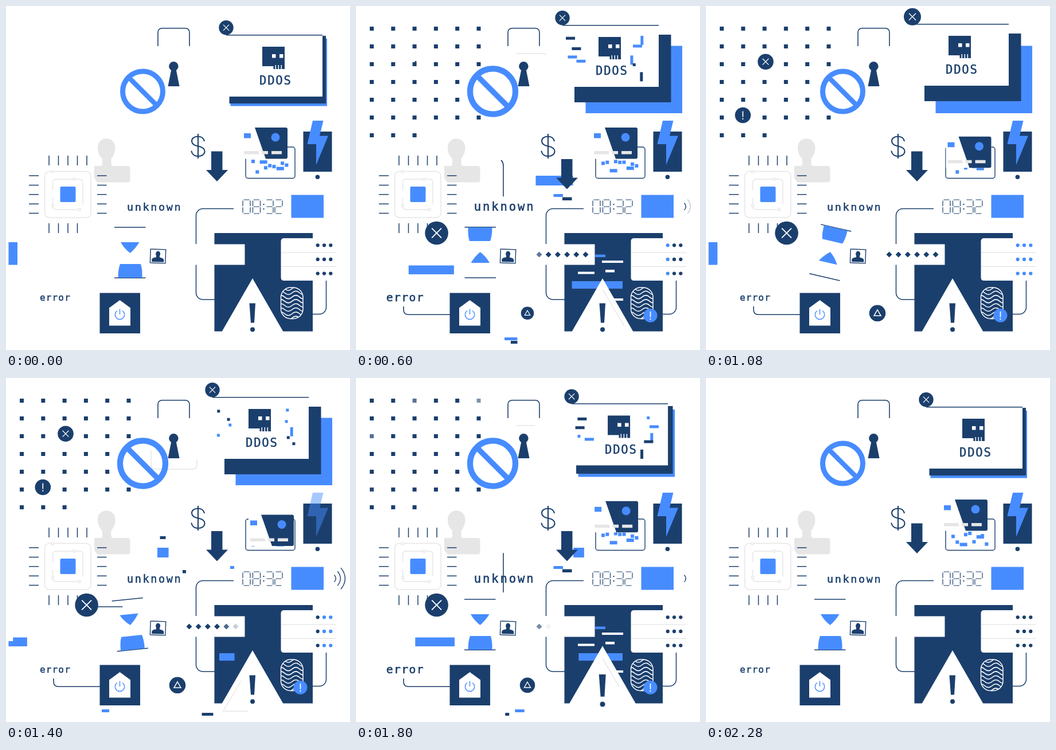
Animation, 600 px wide and 600 px high, one loop 2320 ms. Source, as an HTML page:

```html
<!DOCTYPE html>
<html lang="en">
<head>
<meta charset="utf-8">
<title>Cyber threats</title>
<style>
html, body { margin: 0; width: 100%; height: 100%; overflow: hidden; background: #fff; }
svg { display: block; width: 100%; height: 100%; }
text { font-family: "DejaVu Sans Mono", "Noto Sans Mono", monospace; fill: #1b3f6d; stroke: #1b3f6d; stroke-width: .5; }
</style>
</head>
<body>
<svg id="stage" viewBox="0 0 600 600"></svg>
<script>
const NAVY = '#1b3f6d', BLUE = '#478cff', GREY = '#e6e6e6', WHITE = '#fff';
const LOOP = 2320, STEP = 40, CYCLE = 1080;
const stage = document.getElementById('stage');

const clamp = v => Math.max(0, Math.min(1, v));
const smooth = p => p * p * (3 - 2 * p);
const cubic = p => p < .5 ? 4 * p ** 3 : 1 - 4 * (1 - p) ** 3;
const ramp = (t, a, b, ease = smooth) => ease(clamp((t - a) / (b - a)));
// 0 to 1 between a and b, back to 0 between c and d
const hold = (t, a, b, c, d) => ramp(t, a, b) - ramp(t, c, d);
// Tail and head of a moving stretch; the head runs a to b, the tail c to d
const sweep = (t, a, b, c, d) => [ramp(t, c, d), ramp(t, a, b)];
const within = (t, a, b) => t >= a && t < b;

// Most parts play twice; the second pass slows down after its start
const pass = t => t < CYCLE ? t : t - CYCLE;
function beat(t) {
  const u = pass(t);
  return t < CYCLE || u < 320 ? u : 320 + (u - 320) * .8;
}

function noise(seed) {
  const v = Math.sin(seed * 12.9898) * 43758.5453;
  return v - Math.floor(v);
}

const rect = (x, y, w, h, fill, more = '') =>
  `<rect x="${x}" y="${y}" width="${w}" height="${h}" fill="${fill}" ${more}/>`;
const circle = (x, y, r, fill, more = '') => `<circle cx="${x}" cy="${y}" r="${r}" fill="${fill}" ${more}/>`;
const shape = (d, fill, more = '') => `<path d="${d}" fill="${fill}" ${more}/>`;
const line = (d, color = NAVY, w = 1.6, more = '') =>
  `<path d="${d}" fill="none" stroke="${color}" stroke-width="${w}" ${more}/>`;
const group = (transform, body) => `<g transform="${transform}">${body}</g>`;
const scaleAt = (x, y, s, body) => group(`translate(${x} ${y}) scale(${s}) translate(${-x} ${-y})`, body);
const times = (n, draw) => Array.from({ length: n }, (_, i) => draw(i)).join('');

const trim = (d, [tail, head], color = NAVY, w = 1.6) => head - tail < .005 ? '' :
  line(d, color, w, `pathLength="1" stroke-dasharray="0 ${tail} ${head - tail} 9"`);

// Bar that travels from x0 to x1
function bar(x0, x1, [tail, head], y, h, fill) {
  if (head - tail < .005) return '';
  const a = x0 + (x1 - x0) * tail, b = x0 + (x1 - x0) * head;
  return rect(Math.min(a, b), y, Math.abs(b - a), h, fill);
}

const ICONS = {
  x: line('M-6 -6L6 6M6 -6L-6 6', WHITE, 1.4),
  bang: line('M0 -7V3M0 5V7.5', WHITE, 1.7),
  tri: line('M0 -6L6 4.5H-6Z', WHITE, 1.5)
};
const badge = (x, y, r, s, icon, fill = NAVY, size = 1) => s < .02 ? '' :
  group(`translate(${x} ${y}) scale(${s})`, circle(0, 0, r, fill) + group(`scale(${size})`, ICONS[icon]));

function dotGrid(t) {
  return times(39, i => {
    const x = 27.5 + i % 6 * 37.3, y = 39.5 + Math.floor(i / 6) * 31;
    if (Math.hypot(x - 238.5, y - 149) < 44) return '';
    const on = 60 + noise(i + 1) ** 2 * 290, off = 2000 - noise(i + 50) ** 2 * 400;
    const o = Math.min(clamp((t - on) / 200), clamp(1 - (t - off) / 240));
    return o ? rect(x - 3.5, y - 3.5, 7, 7, NAVY, `opacity="${o}"`) : '';
  });
}

function padlock(u) {
  const body = 'M261 83Q253 83 253 91V151Q253 159 261 159H325Q333 159 333 151V91Q333 83 325 83H279';
  return line('M265 70V46.7Q265 38.700 273 38.700H312Q320 38.700 320 46.700V70')
    + trim(body, sweep(u, 0, 560, 160, 770), GREY, 1.5)
    + circle(292.4, 105.3, 8.2, NAVY) + shape('M288.500 110H296.500L302.500 140H282.500Z', NAVY)
    + scaleAt(238.5, 149, 1 + .13 * hold(u, 40, 240, 640, 960),
      circle(238.5, 149, 35, 'none', `stroke="${BLUE}" stroke-width="9"`) + line('M214 124.500L263 173.500', BLUE, 8.5));
}

// Fragments left and right of the skull, reshuffled in short intervals
function fragments(u) {
  if (!within(u, 160, 760)) return '';
  const set = Math.floor(u / 160) * 40;
  return times(9, i => {
    const n = k => noise(set + i * 3 + k);
    const x = (i % 2 ? 390 : 502) + n(1) * 24;
    const long = n(2) > .45 ? 16 : 5, tall = i % 4 === 0 && long === 16;
    return rect(x, 68 + Math.floor(i / 2) * 14 + n(3) * 9, tall ? 5 : long, tall ? 16 : 5, i % 2 === (i > 4 ? 1 : 0) ? BLUE : NAVY);
  });
}

const skull = shape('M447 71H486V110H466.500V105H447Z', NAVY)
  + shape('M464 84h6.500v6.500h-6.500ZM477 84h6.500v6.500h-6.500Z', WHITE)
  + line('M470.300 103V111M475.300 103V111M480.300 103V111', WHITE, 1.5);

function attackWindow(t, u) {
  const open = hold(t, 40, 560, 1480, 2000), swing = open * (1 - open);
  const bump = hold(t, 920, 1080, 1080, 1240);
  const at = (x, y, bend, body) => group(`translate(${x * open - bend * swing} ${y * open - bend * swing * .9})`, body);
  const lift = body => group(`translate(0 ${-2 * bump})`, body);
  return at(9, 12.5, 31, rect(391.5, 57, 168.5, 117.5, BLUE))
    + lift(at(-8.5, -2, 12, rect(389.5, 52, 168.5, 118, NAVY))
      + at(-24, -17, 0, rect(384, 50.5, 168, 107.5, WHITE) + line('M384 50.700H552', NAVY, 1.5) + skull
        + '<text x="442" y="137.300" font-size="20.500" letter-spacing="1.800">DDOS</text>' + fragments(u)
        + badge(384, 37.8, 12.7, 1 + .18 * bump, 'x', NAVY, .85)));
}

const person = shape('M160 247C160 226 190.500 226 190.500 247C190.500 256 187 262 183.500 266V275Q183.500 279 188 279H212Q216.500 279 216.500 284V303Q216.500 307.500 212 307.500H159L154 300V279H164Q168 279 168 275V266C163 262 160 256 160 247Z', GREY);

const node = (x, y) => circle(x, y, 2.2, WHITE, `stroke="${GREY}" stroke-width="1.300"`);
const chip = rect(67.5, 288.5, 80.5, 80.5, WHITE, `rx="8" stroke="${GREY}" stroke-width="1.500"`)
  + times(5, i => {
    const x = 75 + i * 16.5, y = 296 + i * 16.4;
    return line(`M${x} 261V278M40 ${y}H57M159 ${y}H175.500` + (i < 4 ? `M${x} 379V396` : ''), NAVY, 1.5);
  })
  + line('M117 302H88Q81.500 302 81.500 308V322M81.500 346V334M121 302H128Q134 302 134 308V346M126 355H88Q81.500 355 81.500 350', GREY, 1.4)
  + node(81, 289) + node(119, 302) + node(81.5, 348) + node(128, 355)
  + rect(94.5, 315, 27, 27, BLUE, 'rx="2"');

function money(t, u) {
  const p = pass(t);
  return line('M346 236C345 231 341 227.500 335 227.500C328 227.500 324 231 324 235.500C324 240 327 243 335 244.500C343 246 346.500 249 346.500 253.500C346.500 258.500 342 262 335 262C328 262 324 258 323.500 252.500M335 223V266', NAVY, 2.1)
    + bar(264, 398, sweep(p, 190, 730, 460, 800), 296, 17, BLUE)
    + bar(264, 293, sweep(p, 240, 400, 280, 440), 276, 5, NAVY)
    + group(`translate(0 ${13.5 * hold(u, 40, 280, 760, 960)})`, shape('M358 253.500H377.500V286H387L368 306L349 286H358Z', NAVY))
    + (within(u, 280, 400) ? rect(391, 328, 7, 5, BLUE) : '')
    + (within(u, 480, 760) ? rect(344.5, 328, 16.5, 5, BLUE) + rect(360, 333.5, 16.5, 5.5, NAVY) : '');
}

function card(t, u) {
  const p = hold(t, 720, 1360, 1480, 1880), set = Math.floor(u / 220) * 30;
  return rect(418, 246, 86, 54.5, 'none', `rx="4" stroke="${NAVY}" stroke-width="1.400"`)
    + times(9, i => rect(428 + i * 7.3, 268 + noise(set + i) * 20, i % 4 === 2 ? 13 : 6, 6, BLUE))
    + group(`translate(${11 * p} ${26.5 * p})`, rect(412, 211, 79, 55.5, WHITE)
      + shape('M434 212H488Q491 212 491 215V263.500Q491 266.500 488 266.500H453Z', NAVY)
      + rect(415, 222, 12, 8.5, BLUE) + circle(470, 229, 7.5, BLUE)
      + shape('M415 253H440L442 258.500H415ZM445 253H457V258.500H447ZM463 253H481V258.500H463Z', GREY));
}

const phone = u => rect(518.5, 219, 50, 70, NAVY) + circle(543.4, 298.3, 3.8, NAVY)
  + shape('M535 200H553.500L547 226.500H562L541 277V241H525.500Z', BLUE, within(u, 280, 400) ? 'opacity=".480"' : '');

// Seven-segment digits, segments a to g
const SEGMENTS = { a: 'M1.5 0h10', b: 'M13 1.5v9.5', c: 'M13 13v9.5', d: 'M1.5 24h10', e: 'M0 13v9.5', f: 'M0 1.5v9.5', g: 'M1.5 12h10' };
const digit = (x, on) => group(`translate(${x} 338)`, line([...on].map(s => SEGMENTS[s]).join(''), NAVY, 1.2));
const clock = digit(413, 'abcdef') + digit(430.5, 'abcdefg') + digit(453, 'abcdg') + digit(469, 'abdeg')
  + rect(448.5, 345, 2, 2, NAVY) + rect(448.5, 353, 2, 2, NAVY);

const signal = u => rect(497.5, 329.5, 56.5, 40, BLUE) + times(3, i => {
  const h = 6.2 + i * 6.2, out = 660 - 150 * i;
  return line(`M${572.5 + i * 5.8} ${349.7 - h}q${5.5 + i * 4.6} ${h} 0 ${h * 2}`, NAVY, 1.4,
    `opacity="${hold(u, 120 + 50 * i, 220 + 50 * i, out, out + 140)}"`);
});

const fingerprint = '<clipPath id="pill"><rect x="479.500" y="491" width="38.500" height="54.500" rx="17"/></clipPath>'
  + line(Array.from({ length: 8 }, (_, i) => `M473 ${493 + i * 7.3}q6.500 -6 13 0t13 0t13 0t13 0`).join(''), WHITE, 1.5, 'clip-path="url(#pill)"')
  + rect(479.5, 491, 38.5, 54.5, 'none', 'rx="17" stroke="#fff" stroke-width="1.500"');

function warning(t, u) {
  const s = 1 + .14 * (hold(t, 120, 280, 400, 560) + hold(t, 1560, 1760, 1800, 1960));
  return scaleAt(430, 530, s, shape('M430 475L488.700 577H371.300Z', WHITE)
    + trim('M430 494L379 581H481Z', sweep(u, 40, 620, 180, 800), GREY, 1.3)
    + shape('M424.500 518.500H435L433 552.500H427Z', NAVY) + circle(430, 564.2, 4, NAVY));
}

const codeLines = shape('M429 444h37v4h-37ZM435 460h16v4.500h-16ZM387 463.500h29v4h-29ZM449 510h17v4h-17Z', WHITE)
  + rect(417, 433.5, 18, 4.5, BLUE);

function server(t, u) {
  const lights = times(9, i => {
    const col = i % 3, delay = 560 + col * 140;
    return circle(543.7 + col * 11.3, 417.3 + Math.floor(i / 3) * 24.6, 3.1, within(t, delay, delay + 760) ? BLUE : NAVY);
  });
  const diamonds = times(6, i => {
    const o = Math.min(clamp((t - 478 + i * 82) / 175), clamp((1904 - i * 92 - t) / 175));
    return o ? shape(`M${319.5 + i * 16.2} 428.500l5 5l-5 5l-5 -5Z`, NAVY, `opacity="${o}"`) : '';
  });
  return line('M397 353.500H343.500A12 12 0 0 0 331.500 365.500V415M331.500 451V500A12 12 0 0 0 343.500 512H364M535 537.500H546.500A12 12 0 0 0 558.500 525.500V479', NAVY, 1.5)
    + rect(363.5, 396, 171.5, 171.5, NAVY) + rect(328, 415.5, 88.5, 36, WHITE)
    + shape('M576 405H485Q479.500 405 479.500 410.500V473.500Q479.500 479 485 479H576Z', WHITE)
    + line('M480 430H576M480 454.500H576', '#dedede', 1.2) + lights + diamonds
    + bar(372, 465, sweep(u, 200, 540, 560, 860), 480, 13, BLUE)
    + (within(u, 480, 760) ? codeLines : '') + warning(t, u) + fingerprint
    + badge(513.5, 539.8, 12, hold(t, 120, 280, 2040, 2300), 'bang', BLUE);
}

function hourglass(t) {
  const turn = 180 * (ramp(t, 0, 440, cubic) + ramp(t, 924, 1520, cubic));
  return group(`rotate(${turn} 216.500 430)`, line('M189 386H243.500M189 474.200H243.500', NAVY, 1.5)
    + shape('M200 412H232.500Q226 423 216.500 431Q206 423 200 412Z', BLUE)
    + shape('M195.500 474Q195.500 459 199 450H235Q238 459 237.500 474Z', BLUE));
}

const portrait = group('translate(0 -.600) rotate(2 265 437)', rect(251.8, 425, 26.5, 24, WHITE, `stroke="${NAVY}" stroke-width="1.400"`)
  + shape('M261 433a4 4.800 0 0 1 8 0a4 4.800 0 0 1 -8 0ZM254.500 447V443Q255 440 262 439V436H268V439Q275 440 275.500 443V447Z', NAVY));
const house = rect(163.5, 500.5, 70.5, 70.5, NAVY) + shape('M198.500 513L217 526.500V557.500H180V526.500Z', WHITE)
  + line('M194 531.500A8.200 8.200 0 1 0 203 531.500M198.500 528.500V538', BLUE, 1.4);

function labels(t, u) {
  const error = 1 + .23 * (hold(t, 40, 240, 640, 880) + hold(t, 1440, 1680, 1840, 2080));
  return trim('M253 269Q257 272 257 279V374', sweep(pass(t), 440, 720, 600, 900))
    + scaleAt(258.5, 350, 1 + .11 * hold(u, 300, 560, 620, 880),
      '<text x="211" y="356.500" font-size="18.500" letter-spacing="2.600">unknown</text>')
    + (within(u, 240, 440) ? rect(308, 335, 6, 5.5, NAVY) : '')
    + trim('M164 538.200H92Q83 538.200 83 530V524', sweep(t, 180, 440, 2040, 2280))
    + scaleAt(86, 508, error, '<text x="59" y="513.500" font-size="16" letter-spacing="1.150">error</text>');
}

// Bars that run along the left and the lower edge
function edgeBars(u) {
  const head = .19 + .81 * ramp(u, 200, 620), tail = ramp(u, 0, 1040);
  return trim('M12.200 412V460.300H172', [tail, head], BLUE, 15.5)
    + bar(167, 312, sweep(u, 220, 760, 340, 780), 578, 5, BLUE)
    + bar(362, 231, sweep(u, 140, 860, 300, 820), 584, 5, NAVY);
}

const badges = (t, u) => trim('M160 399H239', sweep(u, 160, 460, 320, 480))
  + badge(140.6, 396, 20.3, hold(t, 40, 240, 2040, 2240), 'x', NAVY, 1.4)
  + badge(104, 97.2, 13.8, hold(t, 560, 760, 1520, 1720), 'x', NAVY, .9)
  + badge(64.3, 190.5, 13.8, hold(t, 680, 880, 1560, 1760), 'bang')
  + badge(299, 535.8, 14.3, hold(t, 480, 650, 1760, 2000), 'tri');

function scene(t) {
  const u = beat(t);
  return '<clipPath id="view"><rect width="600" height="589.500"/></clipPath><g clip-path="url(#view)">'
    + dotGrid(t) + padlock(u) + attackWindow(t, u) + person + chip + money(t, u) + card(t, u) + phone(u)
    + clock + signal(u) + server(t, u) + hourglass(t) + portrait + house + labels(t, u)
    + edgeBars(u) + badges(t, u) + '</g>';
}

const start = performance.now();
let shown = -1;
function tick() {
  const t = Math.floor((performance.now() - start) % LOOP / STEP) * STEP;
  if (t !== shown) stage.innerHTML = scene(shown = t);
  requestAnimationFrame(tick);
}
tick();
</script>
</body>
</html>
```
